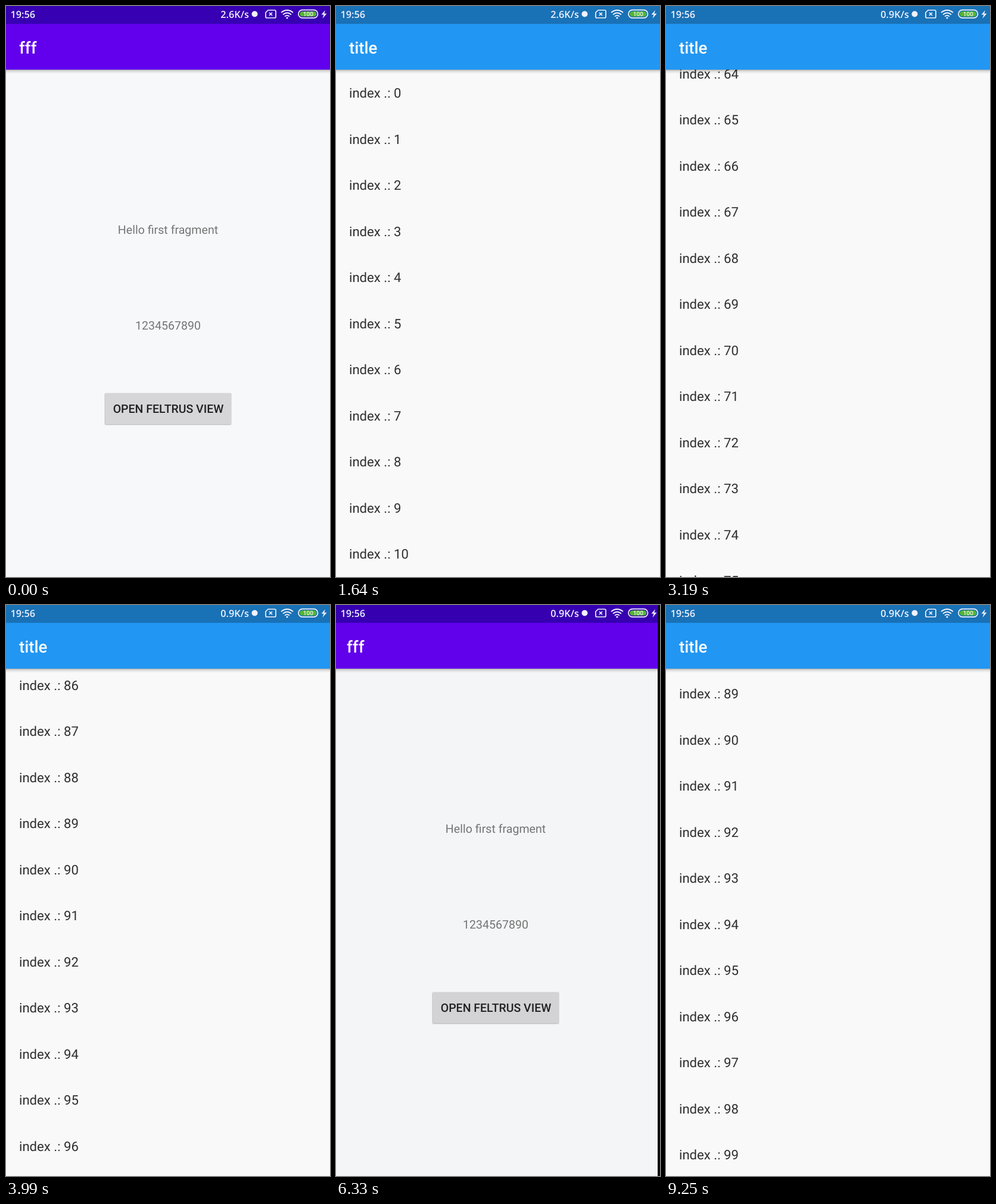
Recreate the animation shown at these times as an HTML page. Size 544 by 960 pixels, loop 9290 ms.

```html
<!DOCTYPE html>
<html lang="en">
<head>
<meta charset="utf-8">
<style>
  html, body { margin: 0; width: 100%; height: 100%; overflow: hidden; background: #000; }
  svg { display: block; width: 100vw; height: 100vh; }
  text { font-family: Roboto, sans-serif; white-space: pre; text-rendering: geometricPrecision; }
  .bar-title { font-size: 27.7px; font-weight: 500; fill: #fff; }
  .label { font-size: 19.6px; fill: #757575; text-anchor: middle; }
  .button { font-size: 19.5px; font-weight: 500; fill: #202020; text-anchor: middle; }
  .row { font-size: 22.15px; fill: #2f2f2f; }
  .status text { font-family: "Open Sans", "Noto Sans", sans-serif; font-size: 16.3px; font-weight: 600; }
  .line { fill: none; stroke: #f1f1fa; stroke-width: 1.7; }
</style>
</head>
<body>
<svg viewBox="0 0 544 960">
  <defs>
    <linearGradient id="shade" x2="0" y2="1">
      <stop stop-color="#000" stop-opacity=".3"/>
      <stop offset=".4" stop-color="#000" stop-opacity=".1"/>
      <stop offset="1" stop-color="#000" stop-opacity="0"/>
    </linearGradient>
  </defs>
  <rect width="544" height="960" fill="#0b0b0d"/>

  <g id="home">
    <rect width="544" height="960" fill="#f7f8f9"/>
    <rect y="107" width="544" height="7" fill="url(#shade)"/>
    <rect width="544" height="107" fill="#6200ee"/>
    <rect width="544" height="30" fill="#3700b3"/>
    <text class="bar-title" x="22" y="79.5">fff</text>
    <text class="label" x="272" y="383">Hello first fragment</text>
    <text class="label" x="272" y="543.5">1234567890</text>
    <rect x="165" y="650.5" width="214" height="54.5" rx="3" fill="#000" opacity=".1"/>
    <rect x="166" y="651.5" width="212" height="52.5" rx="3" fill="#000" opacity=".12"/>
    <rect x="166.5" y="651" width="211.5" height="52" rx="2.5" fill="#d6d6d8"/>
    <text class="button" x="272.5" y="684">OPEN FELTRUS VIEW</text>
  </g>
  <rect id="dim" width="544" height="960"/>

  <g id="list">
    <rect width="544" height="960" fill="#f9f9f9"/>
    <g id="rows"></g>
    <rect y="107" width="544" height="7" fill="url(#shade)"/>
    <rect width="544" height="107" fill="#2196f3"/>
    <rect width="544" height="30" fill="#1971b6"/>
    <text class="bar-title" x="22" y="79.5">title</text>
  </g>

  <g class="status" fill="#f1f1fa">
    <text x="7.5" y="19.7">19:56</text>
    <text id="speed" x="408" y="19.7" text-anchor="end"></text>
    <circle cx="417.5" cy="13.5" r="5"/>
    <path class="line" d="M440 7h11q2 0 2 2v9q0 2-2 2h-13q-2 0-2-2v-7z"/>
    <path class="line" d="M442 11l5 5m0-5l-5 5"/>
    <path class="line" d="M462 11q10-8 20 0M465 14.5q7-6 14 0M468 17.7q4-3.5 8 0"/>
    <circle cx="472" cy="20" r="1.6"/>
    <rect class="line" x="491" y="6.7" width="32.5" height="13.4" rx="6.7"/>
    <rect x="493.3" y="9" width="28" height="8.8" rx="4.4" fill="#53b52f"/>
    <text x="507.3" y="17.2" text-anchor="middle" style="font-size:10px">100</text>
    <path d="M536 7l-6.5 7.6h4l-2 6.4 7-8.2h-4.2z"/>
  </g>
</svg>
<script>
const LOOP = 9290, ROW = 77.5, ROW_COUNT = 100, TRAVEL = 560;
const byId = id => document.getElementById(id);
const home = byId('home'), dim = byId('dim'), list = byId('list'), speed = byId('speed');

const rows = Array.from({ length: 13 }, () => {
  const row = document.createElementNS('http://www.w3.org/2000/svg', 'text');
  row.setAttribute('class', 'row');
  row.setAttribute('x', 22);
  return byId('rows').appendChild(row);
});

const progress = (t, start, duration) => Math.min(1, Math.max(0, (t - start) / duration));
const easeOut = u => 1 - (1 - u) ** 3;

// Each fling: start, duration, distance
const flings = [[1800, 650, 2200], [2420, 760, 2792.5], [3400, 1150, 1902]];
const scrollAt = t => flings.reduce((sum, [start, duration, distance]) =>
  sum + distance * easeOut(progress(t, start, duration)), 0);

const slideIn = (t, start) => TRAVEL * (1 - easeOut(progress(t, start, 509)));

function listX(t) {
  if (t < 5640) return slideIn(t, 700);
  if (t >= 7250) return slideIn(t, 7250);
  const drag = progress(t, 5640, 690), u = drag * drag * (3 - 2 * drag);
  return 544 * u + 16 * progress(t, 6330, 70);
}

function draw(t) {
  const x = listX(t), scroll = scrollAt(t);
  home.setAttribute('transform', `translate(${(x - TRAVEL) / 4})`);
  dim.setAttribute('opacity', 0.38 * (1 - x / TRAVEL));
  list.setAttribute('transform', `translate(${x})`);
  speed.textContent = t < 2300 ? '2.6K/s' : '0.9K/s';

  const first = Math.max(0, Math.floor(scroll / ROW) - 1);
  rows.forEach((row, i) => {
    const index = first + i;
    row.textContent = index < ROW_COUNT ? `index .: ${index}` : '';
    row.setAttribute('y', 154 + index * ROW - scroll);
  });
}

const begin = performance.now();
function tick() {
  draw((performance.now() - begin) % LOOP);
  requestAnimationFrame(tick);
}
tick();
</script>
</body>
</html>
```
